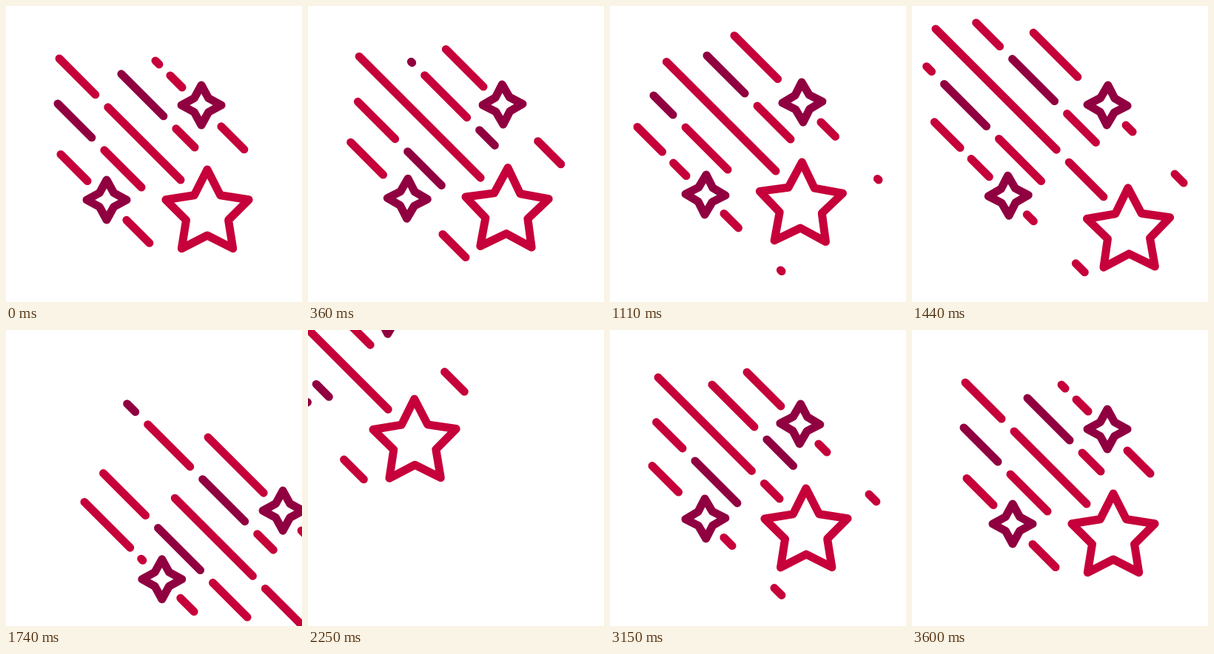
An HTML page with a canvas for the animation above (3.63 s loop, 400 px wide and 400 px high).

```html
<!DOCTYPE html>
<html lang="en">
<head>
<meta charset="utf-8">
<title>Shooting stars</title>
<style>
  html, body { margin: 0; width: 100%; height: 100%; overflow: hidden; background: #fff; }
  canvas { display: block; width: 400px; height: 400px; }
</style>
</head>
<body>
<canvas id="stage"></canvas>
<script>
const RED = '#c6003a', DARK = '#900040';
const LOOP = 3630, END = 3600, PULL = 1110, LAUNCH = 1140, LAND = 2250;
const { sin, cos, PI, min, max } = Math;
const canvas = document.getElementById('stage');
const ratio = window.devicePixelRatio || 1;
canvas.width = canvas.height = 400 * ratio;
const ctx = canvas.getContext('2d');

// Backward dash flow: whole periods per loop, with periodic changes of speed
function flow(t, total, slow, wobble) {
  const x = t / END, a = 2 * PI * x;
  return total * (x - slow * sin(a) + 0.046 * (1 - cos(a)) + wobble * sin(2 * a));
}

const windup = t => sin(min(t / PULL, 1) * PI / 2) ** 2;

// Trails stretch during the flight
const stretch = t => t > LAUNCH && t < LAND ? sin(PI * (t - LAUNCH) / (LAND - LAUNCH)) ** 2 : 0;

// Short trails also grow with the pull and shrink slowly afterwards
const tension = t => t < PULL ? sin(t / PULL * PI / 2) : 1 - ((t - PULL) / (END - PULL)) ** 2;

const leaving = (t, delay) => t < 1850 + 0.7 * delay;

// Diagonal shift: pull back, shoot off, return from the far corner
function shift(t, back, delay, entry) {
  if (leaving(t, delay)) {
    const u = max(0, t - LAUNCH - delay) / 600;
    return 276 * u ** 3 - back * windup(t);
  }
  const rush = max(0, LAND - t) / 400;
  return -entry * ((END - t) / (END - LAND)) ** (2.65 + delay / 1000) - 90 * rush * rush;
}

function stroke(color) {
  ctx.strokeStyle = color;
  ctx.stroke();
}

// Dashes along y = x - lane, visible for x in [from, to]
function dashes(lane, from, to, start, len, period, color) {
  const first = start + Math.floor((from - start) / period) * period;
  for (let x = first; x <= to; x += period) {
    const a = max(x, from), b = min(x + len, to);
    if (b < a) continue;
    ctx.beginPath();
    ctx.moveTo(a, a - lane);
    ctx.lineTo(b + 0.01, b + 0.01 - lane);
    stroke(color);
  }
}

function star(x, y, points, outer, inner, degrees, color) {
  ctx.beginPath();
  for (let i = 0; i < points * 2; i++) {
    const r = i % 2 ? inner : outer;
    const a = i * PI / points + degrees * PI / 180;
    ctx.lineTo(x + r * sin(a), y - r * cos(a));
  }
  ctx.closePath();
  stroke(color);
}

function midLane(t, lane, tip, phase, delay, entry) {
  const end = tip + shift(t, 11, delay, entry);
  const from = end - 113 - 86 * stretch(t);
  const start = end + phase - flow(t, 7 * 148, 0.071, 0);
  dashes(lane, from, end, start, 57, 148, DARK);
  dashes(lane, from, end, start + 74, 57, 148, RED);
}

function smallStar(t, x, y, lane, phase, back, delay, entry, tilt) {
  const d = shift(t, back, delay, entry);
  const cx = x + d, end = cx - 26;
  const from = end - 36 - 30 * tension(t) - 15 * stretch(t);
  dashes(lane, from, end, end + phase - flow(t, 8 * 98, 0.044, -0.022), 83, 98, RED);
  dashes(lane, cx + 25, cx + 103, cx + 27 - flow(t, 9 * 88, 0.028, -0.008), 31, 88, RED);
  star(cx, y + d, 4, 27, 13.5, tilt, DARK);
}

function mainStar(t, tilt) {
  const d = shift(t, 12, 0, 128), end = 236 + d;
  const from = end - 164 - 111 * stretch(t);
  dashes(1, from, end, end - 98 - flow(t, 4 * 200, 0.049, 0.02), 183, 200, RED);
  const lean = leaving(t, 0) ? 2 * windup(t) : 0;
  star(272 + d - lean, 280 + d + lean, 5, 59, 30, tilt, RED);
}

function draw(t) {
  ctx.setTransform(ratio, 0, 0, ratio, 0, 0);
  ctx.fillStyle = '#fff';
  ctx.fillRect(0, 0, 400, 400);
  ctx.lineWidth = 11;
  ctx.lineCap = ctx.lineJoin = 'round';

  const sway = 2 * sin((t - 60) / 840 * 2 * PI) * min(1, t / 120, (END - t) / 500);

  midLane(t, 64, 255, -99, 150, 162);
  midLane(t, -62, 183, -124, 107, 155);
  smallStar(t, 264, 134, 128, -16, 4, 154, 156, -sway);
  smallStar(t, 136, 262, -126.5, -41, 7, 201, 164, sway);
  mainStar(t, sway * (1 - t / END));
}

function tick() {
  draw(min(performance.now() % LOOP, END));
  requestAnimationFrame(tick);
}
tick();
</script>
</body>
</html>
```
